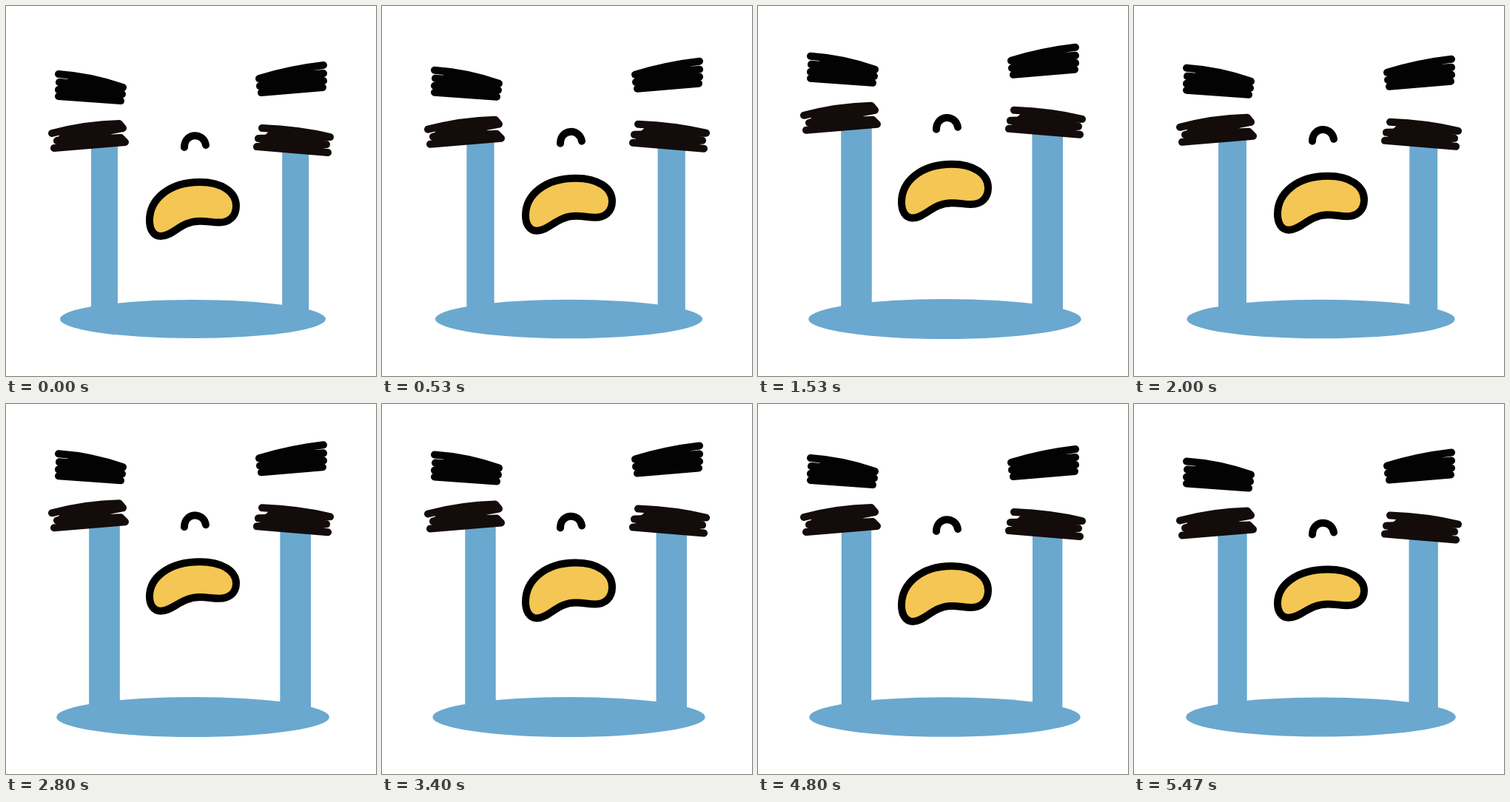
Write an HTML page that moves like this. It is 500 px wide and 500 px high and loops after 5540 ms.

```html
<!DOCTYPE html>
<html lang="en">
<head>
<meta charset="utf-8">
<title>Crying face</title>
<style>
  html, body { margin: 0; width: 100%; height: 100%; overflow: hidden; background: #fff; }
  svg { display: block; width: 100%; height: 100%; }
  .water { fill: #6aa8cf; }
  .ink { fill: none; stroke: #000; stroke-width: 10; stroke-linecap: round; stroke-linejoin: round; }
  .brow { stroke: #030303; }
  .eye { stroke: #130c0b; }
  .core { stroke: none; }
  .brow .core { fill: #030303; }
  .eye .core { fill: #130c0b; }
  .mouth { fill: #f4c653; vector-effect: non-scaling-stroke; }
</style>
</head>
<body>
<svg viewBox="0 0 500 500">
  <g class="water">
    <ellipse id="puddle" cx="252.5" cy="423"/>
    <rect class="stream" data-x="133"/>
    <rect class="stream" data-x="391.2"/>
  </g>
  <g id="face">
    <g class="ink brow">
      <path d="M71 92Q115 95 158 110L72 103L157 119L71 113L155 128L71 122"/>
      <path class="core" d="M90 95L158 110L155 128L71 122L73 104Z"/>
      <path d="M429 80Q385 85 342 98L429 91L343 108L429 101L345 117L428 110"/>
      <path class="core" d="M410 84L342 98L345 117L428 110L427 92Z"/>
    </g>
    <g class="ink eye">
      <path d="M62 172Q108 160 153 159L158 165L69 182L155 178L161 184L65 192"/>
      <path class="core" d="M75 170L145 162L140 172L157 184L68 190L69 180Z"/>
      <path d="M346 165Q396 167 438 177L341 179L433 187L339 190L435 198"/>
      <path class="core" d="M358 167L430 177L430 196L342 189L344 180Z"/>
    </g>
    <path class="ink" d="M241 191C241 171 267 170 270 188"/>
    <path class="ink mouth" id="mouth" d="M262 238C292 238 311 252 311 271C311 286 301 294 288 294C278 294 273 292 262 292C236 292 226 313 209 313C199 313 194 303 194 291C194 262 220 238 262 238Z"/>
  </g>
</svg>
<script>
  const LOOP = 5540, STEP = 1000 / 15, LAST_STEP = 82;
  const BOB_STEPS = 9.4, MOUTH_STEPS = 23.3;
  const byId = id => document.getElementById(id);
  const face = byId('face'), mouth = byId('mouth'), puddle = byId('puddle');
  const streams = [...document.querySelectorAll('.stream')];
  const wave = turns => Math.cos(turns * 2 * Math.PI);
  const ease = u => u * u * (3 - 2 * u);
  const pingPong = turns => 1 - Math.abs(1 - 2 * (turns % 1));

  function set(el, attrs) {
    for (const name in attrs) el.setAttribute(name, attrs[name]);
  }

  function draw(time) {
    // Step boundaries fall on the nearest 10 ms.
    const step = Math.min(LAST_STEP, Math.floor((time % LOOP + 4) / STEP));
    const lift = 25 * ease(pingPong(step / BOB_STEPS));
    const mouthScale = (69.4 + 5.8 * wave(step / MOUTH_STEPS - 0.14)) / 75;

    set(face, { transform: `translate(0 ${-lift})` });
    set(mouth, { transform: `translate(0 ${238 * (1 - mouthScale)}) scale(1 ${mouthScale})` });
    set(puddle, { rx: 179.5 + lift * 0.2, ry: 26 + lift * 0.04 });

    const width = 36 + lift * 0.23, top = 180 - lift;
    for (const stream of streams) {
      set(stream, { x: stream.dataset.x - width / 2, y: top, width, height: 423 - top });
    }
  }

  let start;
  function tick(now) {
    start ??= now;
    draw(now - start);
    requestAnimationFrame(tick);
  }
  draw(0);
  requestAnimationFrame(tick);
</script>
</body>
</html>
```
